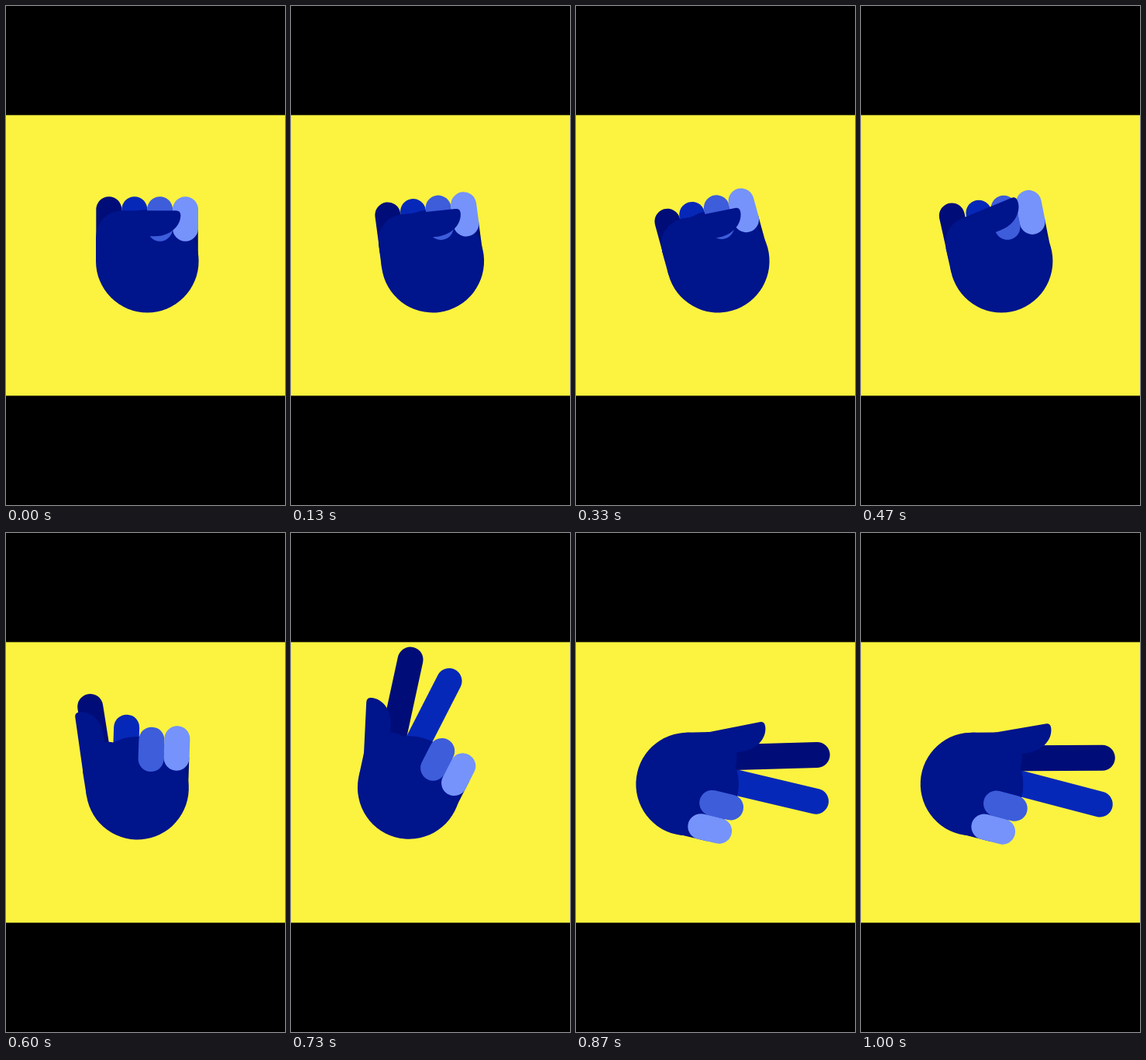
Animation, 360 px wide and 642 px high, one loop 1070 ms. Source, as an HTML page with a canvas:

```html
<!DOCTYPE html>
<html lang="en">
<head>
<meta charset="utf-8">
<title>Hand game</title>
<style>
  html, body { margin: 0; width: 100%; height: 100%; overflow: hidden; background: #000; }
  canvas { display: block; width: 100%; height: 100%; }
</style>
</head>
<body>
<canvas id="stage" width="360" height="642"></canvas>
<script>
const ctx = document.getElementById('stage').getContext('2d');
const LOOP = 1070;
const STEP = 200 / 3;   // 15 poses per second
const R = 66.3;         // palm radius
const W = 33;           // finger width
const KNUCKLE = 66.5;   // fingertip height in the fist
const COLORS = {
  sky: '#fbf33f', palm: '#00148c', side: '#000f7a', index: '#000d78',
  middle: '#0628b8', ring: '#3d5ddb', pinky: '#7593fb'
};

// Quadratic ease-in-out between two times, from 0 to 1
function ease(t, from, to) {
  const u = Math.min(1, Math.max(0, (t - from) / (to - from)));
  return u < 0.5 ? 2 * u * u : 1 - 2 * (1 - u) * (1 - u);
}

const mix = (a, b, k) => a + (b - a) * k;

// Wind up to the left, open two fingers, then throw to the right.
function poseAt(t) {
  const windUp = ease(t, 0, 267);
  const drift = ease(t, 378, 915);
  const lean = ease(t, 340, 870);
  const fling = ease(t, 680, 885);
  const unfold = ease(t, 400, 713);
  const slide = ease(t, 479, 765);
  const reach = ease(t, 529, 831);
  return {
    x: mix(182.3, 183.3, windUp) - 40.3 * drift,
    y: mix(328.2, 323, fling),
    turn: -15.4 * windUp + 36 * lean + 84 * fling,
    spread: -14.9 * unfold,
    indexSide: mix(-49.5, -32.8, slide),
    indexTip: mix(KNUCKLE, 168.5, ease(t, 408, 810)),
    middleTip: mix(KNUCKLE, 166.5, reach),
    ringTip: mix(KNUCKLE, 61.3, unfold),
    pinkyTip: mix(KNUCKLE, 53.7, reach),
    thumb: 90 + 4 * windUp - 103.5 * ease(t, 400, 658)
  };
}

function disc(x, y, r, color) {
  ctx.fillStyle = color;
  ctx.beginPath();
  ctx.arc(x, y, r, 0, Math.PI * 2);
  ctx.fill();
}

function finger(x, tip, root, color) {
  ctx.strokeStyle = color;
  ctx.lineWidth = W;
  ctx.lineCap = 'round';
  ctx.beginPath();
  ctx.moveTo(x, -root);
  ctx.lineTo(x, -tip);
  ctx.stroke();
}

function rotated(deg, draw) {
  ctx.save();
  ctx.rotate(deg * Math.PI / 180);
  draw();
  ctx.restore();
}

// The thumb swings around the rounded upper corner of the palm.
function thumb(angle) {
  ctx.translate(-W, -32);
  rotated(angle, () => {
    ctx.fillStyle = COLORS.palm;
    ctx.beginPath();
    ctx.moveTo(-W, 1);
    ctx.lineTo(-W, -70);
    ctx.quadraticCurveTo(-W, -76, -W + 6, -76);
    ctx.bezierCurveTo(-13, -76, 0, -62, 0, -43);
    ctx.lineTo(0, 1);
    ctx.fill();
  });
}

function drawHand(p) {
  ctx.save();
  ctx.translate(p.x, p.y);
  rotated(p.turn, () => {
    ctx.fillStyle = COLORS.side;
    ctx.fillRect(W, -42, 32.5, 42);
    finger(-16.5, p.middleTip, 20, COLORS.middle);
    rotated(p.spread, () => finger(p.indexSide, p.indexTip, 20, COLORS.index));

    disc(0, 0, R, COLORS.palm);
    rotated(p.spread, () => {
      ctx.fillRect(-R, -32, R, 32);
      disc(-W, -32, W, COLORS.palm);
    });

    finger(16.3, p.ringTip, p.ringTip - 24.5, COLORS.ring);
    finger(49.2, p.pinkyTip, p.pinkyTip - 24.5, COLORS.pinky);
    rotated(p.spread, () => thumb(p.thumb));
  });
  ctx.restore();
}

function render(ms) {
  // Hold each pose for one step, on a 10 ms clock
  const tick = Math.floor((ms % LOOP) / 10) * 10;
  const step = Math.floor((tick + 3.4) / STEP);

  ctx.fillStyle = '#000';
  ctx.fillRect(0, 0, 360, 642);
  ctx.fillStyle = COLORS.sky;
  ctx.fillRect(0, 140.4, 360, 361);
  drawHand(poseAt(step * STEP));
}

let start;
function loop(now) {
  if (start === undefined) start = now;
  render(Math.max(0, now - start));
  requestAnimationFrame(loop);
}
render(0);
requestAnimationFrame(loop);
</script>
</body>
</html>
```
